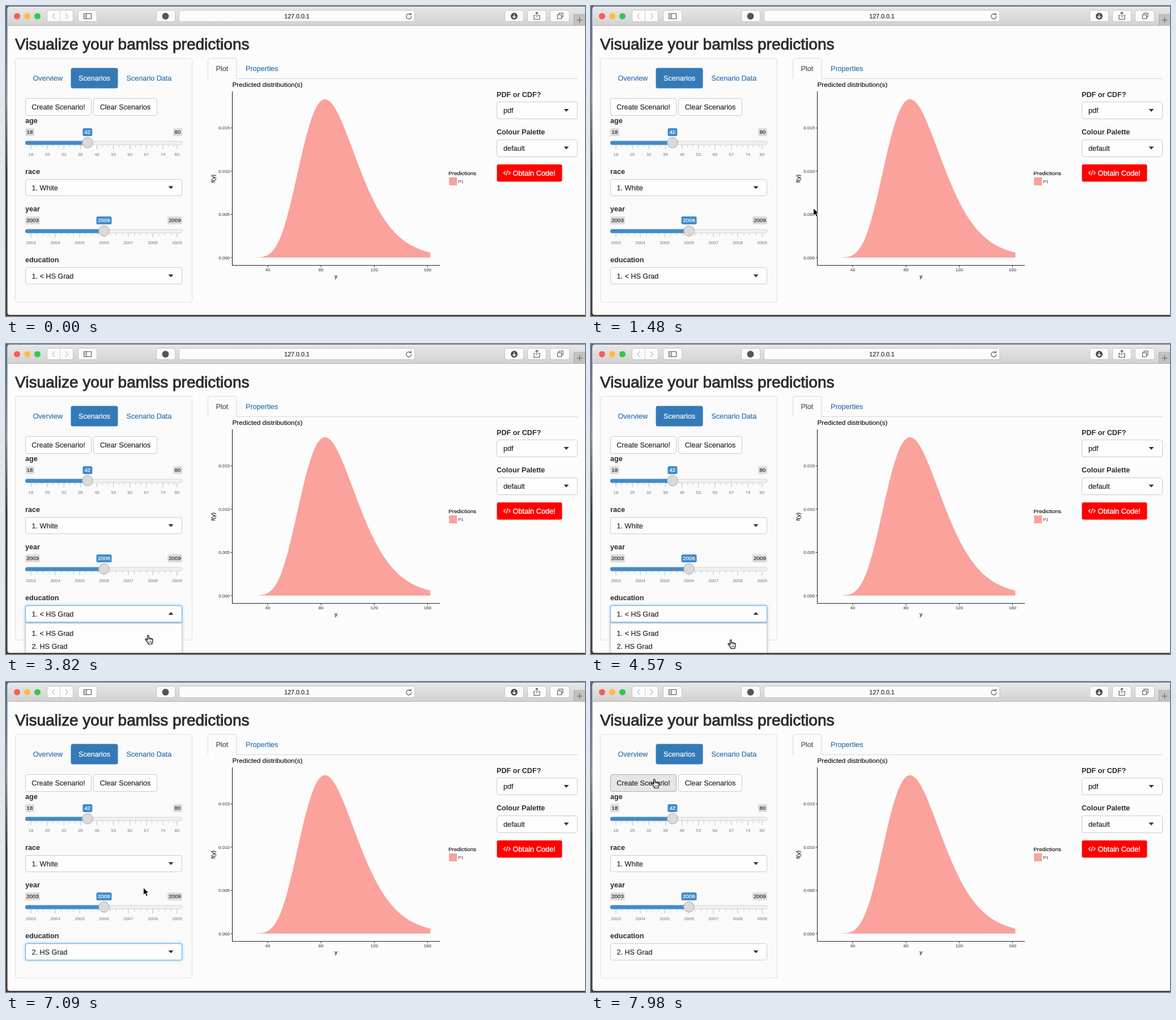
Write an HTML page that moves like this. It is 1022 px wide and 548 px high and loops after 8000 ms.

```html
<!DOCTYPE html>
<html lang="en">
<head>
<meta charset="utf-8">
<title>Prediction app</title>
<style>
html, body { margin: 0; width: 100%; height: 100%; overflow: hidden; background: #fcfcfc; }
svg { display: block; width: 1022px; height: 548px; font-family: "Liberation Sans", Arial, sans-serif; }
text { font-size: 12.6px; color: #2c2c2c; fill: currentColor; stroke: currentColor; stroke-width: .22px; white-space: pre; }
.mid { text-anchor: middle; }
.end { text-anchor: end; }
.bold { font-weight: bold; stroke-width: 0; }
.link { color: #2f73b0; }
.white { color: #fff; }
.box { fill: #fdfdfd; stroke: #ccc; }
.tool { fill: #fbfbfb; stroke: #c6c5c6; }
.icon { fill: none; stroke: #555; stroke-width: 1.1; }
.title { font-size: 28px; stroke-width: .9px; }
.address { font-size: 10.7px; }
.strong { font-size: 12.8px; stroke-width: .35px; }
.tab { color: #555; }
.badge { font-size: 9.7px; }
.scale, .tick { font-size: 7.9px; stroke-width: .12px; }
.scale { color: #8c8c8c; }
.tick { color: #4d4d4d; }
.axis { font-size: 9.9px; color: #000; stroke-width: .1px; }
.plot-title { font-size: 11.8px; color: #000; stroke-width: .1px; }
.button.over { fill: #e6e6e6; stroke: #adadad; }
</style>
</head>
<body>
<svg id="stage" viewBox="0 0 1022 548">
  <defs>
    <linearGradient id="bar" x2="0" y2="1"><stop stop-color="#e8e7e8"/><stop offset="1" stop-color="#d3d2d3"/></linearGradient>
    <linearGradient id="desk" x2="0" y2="1">
      <stop stop-color="#4c6a8c"/><stop offset=".3" stop-color="#8d949f"/>
      <stop offset=".55" stop-color="#302d30"/><stop offset="1" stop-color="#453a32"/>
    </linearGradient>
    <clipPath id="page"><path d="M3 35H1022V546H3z"/></clipPath>
  </defs>
  <path fill="url(#desk)" d="M0 0H1022V548H0z"/>
  <path fill="#fcfcfc" d="M2.500 6q0-5 5-5H1022V546H7q-4.500 0-4.500-4z"/>
  <path fill="url(#bar)" d="M2.500 6q0-5 5-5H1022V34H2.500z"/>
  <path stroke="#b4b3b4" d="M2.500 34.500H1022"/>
  <g id="chrome"></g>
  <g id="app"></g>
  <g id="menu" clip-path="url(#page)"></g>
  <g id="arrow"><path d="M.5.500V13.500L3.500 10.700 5.700 15.700 8.200 14.600 6 9.800H10z" stroke="#fff" stroke-width=".9"/></g>
  <g id="hand">
    <path d="M4.500 8.500V1.200Q4.500-.2 5.700-.2T7 1.200V5Q9 4.400 9.600 5.600 11.400 5 12 6.300 14 6 14 8V10.500Q13.700 12.500 12.700 13.700V15.500H6V14Q4.500 12.500 3.200 10.500L1.200 8Q.8 6.600 2 6.300 3.200 6.500 4.500 8.500z" fill="#fff" stroke="#000" stroke-width="1.200"/>
    <path d="M7 5V8M9.600 5.800V8.300M12 6.500V8.600M7.500 10.500V13M9.500 10.500V13M11.300 10.500V13" stroke="#000" stroke-width=".8"/>
  </g>
</svg>
<script>
const $ = id => document.getElementById(id);
let layer = $('chrome');

function add(tag, attrs, content = '') {
  const el = document.createElementNS('http://www.w3.org/2000/svg', tag);
  for (const key in attrs) el.setAttribute(key, attrs[key]);
  el.textContent = content;
  return layer.appendChild(el);
}
const text = (x, y, content, cls = '') => add('text', { x, y, class: cls }, content);
const path = (d, attrs) => add('path', { d, fill: 'none', ...attrs });
const circle = (cx, cy, r, fill, attrs) => add('circle', { cx, cy, r, fill, ...attrs });
const box = (left, top, right, bottom, cls = 'box', rx = 3.5) =>
  add('rect', { x: left + .5, y: top + .5, width: right - left - 1, height: bottom - top - 1, rx, class: cls });
const fill = (x, y, width, height, color, rx = 0) => add('rect', { x, y, width, height, rx, fill: color });
const caret = (x, y) => path(`M${x - 4.5} ${y - 2.5}h9l-4.500 5z`, { fill: '#333' });

function drawChrome() {
  [['#fc5b57', 19.5], ['#fdbc40', 37.5], ['#34c84a', 55.5]].forEach(([color, x]) => circle(x, 18, 5.5, color));
  [[72, 119], [127, 161], [265, 299], [305, 722], [880, 914], [920, 954], [960, 995]]
    .forEach(([left, right]) => box(left, 7, right, 28, 'tool'));
  path('M95.500 8V27', { stroke: '#d0d0d0' });
  path('M86 13l-4 5 4 5M105 13l4 5-4 5', { stroke: '#b5b5b5', 'stroke-width': 1.2 });
  path('M137.500 13.500h13v9h-13zM142 13.500v9M139 16h1.500M139 18h1.500M139 20h1.500', { class: 'icon' });
  circle(281.5, 18, 6, '#555');
  text(513.5, 22, '127.0.0.1', 'address mid');
  path('M714.500 15.500A4.500 4.500 0 1 0 715.500 18M711.500 15.500h3.500v-3.500', { class: 'icon' });
  circle(897, 18, 6, '#4a4a4a');
  path('M897 14.500V21M894 18.300l3 3 3-3', { stroke: '#fff', 'stroke-width': 1.4 });
  path('M934.500 16.500h-2.500v7h10v-7h-2.500M937 20v-8.500M934.500 13.500l2.500-2.500 2.500 2.500', { class: 'icon' });
  path('M973.500 15.500h7v7h-7zM976 15v-2.500h7v7h-2.500', { class: 'icon' });
  fill(1002, 14, 20, 20, '#c2c1c2');
  path('M1002.500 14V34', { stroke: '#aaa' });
  path('M1012.500 20v10M1007.500 25h10', { stroke: '#666', 'stroke-width': 1.2 });
}

function badge(x, y, width, label, active) {
  fill(x - width / 2, y, width, 14, active ? '#428bca' : '#dcdcdc', 2.5);
  text(x, y + 10.4, label, 'badge mid' + (active ? ' white' : ''));
}

function slider(top, min, max, value, step, parts, badgeWidth) {
  const at = v => 44 + 258 * (v - min) / (max - min);
  const x = at(value);
  badge(34 + badgeWidth / 2, top, badgeWidth, min);
  badge(311 - badgeWidth / 2, top, badgeWidth, max);
  badge(x, top, badgeWidth + 1, value, true);
  add('rect', { x: 34.5, y: top + 23, width: 276.5, height: 6, rx: 3, fill: '#f1f1ee', stroke: '#d3d1cc' });
  fill(34, top + 22.5, x - 34, 7, '#428bca', 3);
  const mark = (v, major) => {
    path(`M${at(v)} ${top + 30}v${major ? 7 : 3.5}`, { stroke: major ? '#94bbdc' : '#bbb', 'stroke-width': .9 });
    if (major) text(at(v), top + 48.5, v, 'scale mid');
  };
  for (let i = 0; min + i * step / parts <= max + .001; i++) mark(min + i * step / parts, i % parts === 0);
  if ((max - min) % step) mark(max, true);
  circle(x, top + 25.5, 9.3, '#dadada', { stroke: '#a9a9a9' });
}

function drawControls() {
  text(16, 77, 'Visualize your bamlss predictions', 'title');
  add('rect', { x: 16.5, y: 92.5, width: 312, height: 431, rx: 3.5, fill: '#fafafa', stroke: '#e0e0e0' });
  text(47.5, 132, 'Overview', 'link');
  fill(114.5, 109.5, 83, 36, '#337ab7', 3.5);
  text(156, 132, 'Scenarios', 'white mid');
  text(212.5, 132, 'Scenario Data', 'link');
  box(34, 163, 151, 194, 'box button').id = 'create';
  box(154, 163, 267, 194, 'box button').id = 'clear';
  text(92.5, 183, 'Create Scenario!', 'mid');
  text(210.5, 183, 'Clear Scenarios', 'mid');
  text(34, 207, 'age', 'bold');
  slider(216, 18, 80, 42, 7, 3, 16);
  text(34, 297, 'race', 'bold');
  box(34, 306, 311, 336);
  text(45.5, 326, '1. White');
  caret(291, 321);
  text(34, 363, 'year', 'bold');
  slider(372, 2003, 2009, 2006, 1, 4, 26);
  text(34, 453, 'education', 'bold');
  box(34, 462, 311, 492);

  text(866, 160.5, 'PDF or CDF?', 'bold');
  box(866, 169, 1009, 200);
  text(878, 189, 'pdf');
  caret(989, 184.5);
  text(866, 227, 'Colour Palette', 'bold');
  box(866, 236, 1009, 267);
  text(878, 256, 'default');
  caret(989, 251);
  fill(866.5, 280, 115, 30.5, '#f00', 3);
  path('M881.500 292l-3 3 3 3M887 292l3 3-3 3M885.500 290.500l-2.500 9', { stroke: '#fff', 'stroke-width': 1.2 });
  text(894.5, 300, 'Obtain Code!', 'white strong');
}

function drawPlot() {
  path('M356.500 128.500V96q0-3.500 3.500-3.500H403.500q3.500 0 3.500 3.500V128.500H1009', { stroke: '#d6d6d6' });
  text(370.5, 115, 'Plot', 'tab');
  text(423, 115, 'Properties', 'link');
  text(399.5, 143, 'Predicted distribution(s)', 'plot-title');

  // Log-normal shape scaled to its mode.
  const mode = 83, spread = .255, peak = 280, color = '#faa29b';
  let d = 'M438 444.800';
  for (let x = 438; x <= 749; x++) {
    const z = Math.log((x - 368) / 2.35 / mode) / spread;
    d += `L${x} ${(444.8 - peak * Math.exp(-z * z / 2)).toFixed(2)}`;
  }
  path(d + 'V444.800z', { fill: color });
  path('M399.500 151V458.500H766', { stroke: '#222', 'stroke-width': 1.1 });
  for (let i = 0; i < 4; i++) {
    const x = 462 + 94 * i, y = 444.8 - 76.4 * i;
    path(`M${x} 459v3M396.500 ${y}h3`, { stroke: '#333' });
    text(x, 469, 40 * (i + 1), 'tick mid');
    text(395, y + 2.8, (i * .005).toFixed(3), 'tick end');
  }
  text(582.5, 481, 'y', 'axis mid');
  add('text', { class: 'axis mid', transform: 'translate(368.500 305) rotate(-90)' }, 'f(y)');
  text(781, 298.5, 'Predictions', 'axis');
  fill(782, 303, 14, 14, color);
  text(798, 313, 'P1', 'tick');
}

function glow(attrs, color, opacity) {
  [8, 5, 3].forEach(width =>
    add('rect', { ...attrs, fill: 'none', stroke: color, 'stroke-width': width, 'stroke-opacity': opacity }));
}

function drawMenu() {
  const list = add('g', { id: 'list' });
  const focus = add('g', { id: 'focus' });
  const field = { x: 34.5, y: 462.5, width: 276, height: 29, rx: 3.5 };
  const sheet = { x: 34.5, y: 493.5, width: 276, height: 70 };
  layer = list;
  glow(sheet, '#000', .04);
  add('rect', { ...sheet, fill: '#fdfdfd', stroke: '#ccc' });
  text(45.5, 515.5, '1. < HS Grad');
  text(45.5, 539, '2. HS Grad');
  layer = focus;
  glow(field, '#66afe9', .13);
  add('rect', { ...field, fill: '#fdfdfd', stroke: '#66afe9' });
  layer = $('menu');
  text(45.5, 482, '').id = 'value';
  caret(291, 477).id = 'down';
  path('M286.500 478.800h9l-4.500-5z', { fill: '#333' }).id = 'up';
  fill(119.2, 468, 1, 18, '#333').id = 'caret';
}

// Pointer stops: time, x, y, and 1 for the hand.
const stops = [
  [440, 490, 531], [590, 440, 515], [740, 395, 500], [890, 345, 470],
  [1030, 318, 430], [1180, 322, 395], [1330, 360, 368], [1480, 392, 357],
  [1630, 388, 320], [1770, 382, 288], [2070, 381, 278], [2220, 350, 285],
  [2370, 323, 320], [2510, 308, 380], [2660, 292, 425], [2800, 282, 471, 1],
  [3240, 273, 467, 1], [3530, 268, 482, 1], [3680, 258, 502, 1], [3820, 245, 515, 1],
  [3970, 242, 520, 1], [4120, 241, 523, 1], [4860, 243, 522],
  [5600, 246, 519], [5750, 246, 514], [5900, 244, 506], [6050, 242, 495], [6190, 241, 482, 1],
  [7090, 242, 363], [7230, 226, 250], [7380, 190, 182, 1], [7530, 106, 172, 1]
];

function render(t) {
  const within = (from, to) => t >= from && t < to;
  const show = (id, on) => { $(id).style.display = on ? '' : 'none'; };
  const open = within(3090, 4860);
  show('focus', within(3090, 7830));
  show('list', open);
  show('up', open);
  show('down', !open && !within(2800, 3090));
  show('caret', within(3970, 4570));
  $('value').textContent = t < 4860 ? '1. < HS Grad' : '2. HS Grad';
  $('clear').classList.toggle('over', within(7380, 7530));
  $('create').classList.toggle('over', t >= 7530);

  const stop = stops.filter(s => s[0] <= t).pop();
  show('arrow', stop && !stop[3]);
  show('hand', stop && stop[3]);
  if (stop) $(stop[3] ? 'hand' : 'arrow').setAttribute('transform', `translate(${stop[1]} ${stop[2]})`);
}

drawChrome();
layer = $('app');
drawControls();
drawPlot();
layer = $('menu');
drawMenu();

const start = performance.now();
function frame() {
  render((performance.now() - start) % 8000);
  requestAnimationFrame(frame);
}
frame();
</script>
</body>
</html>
```
